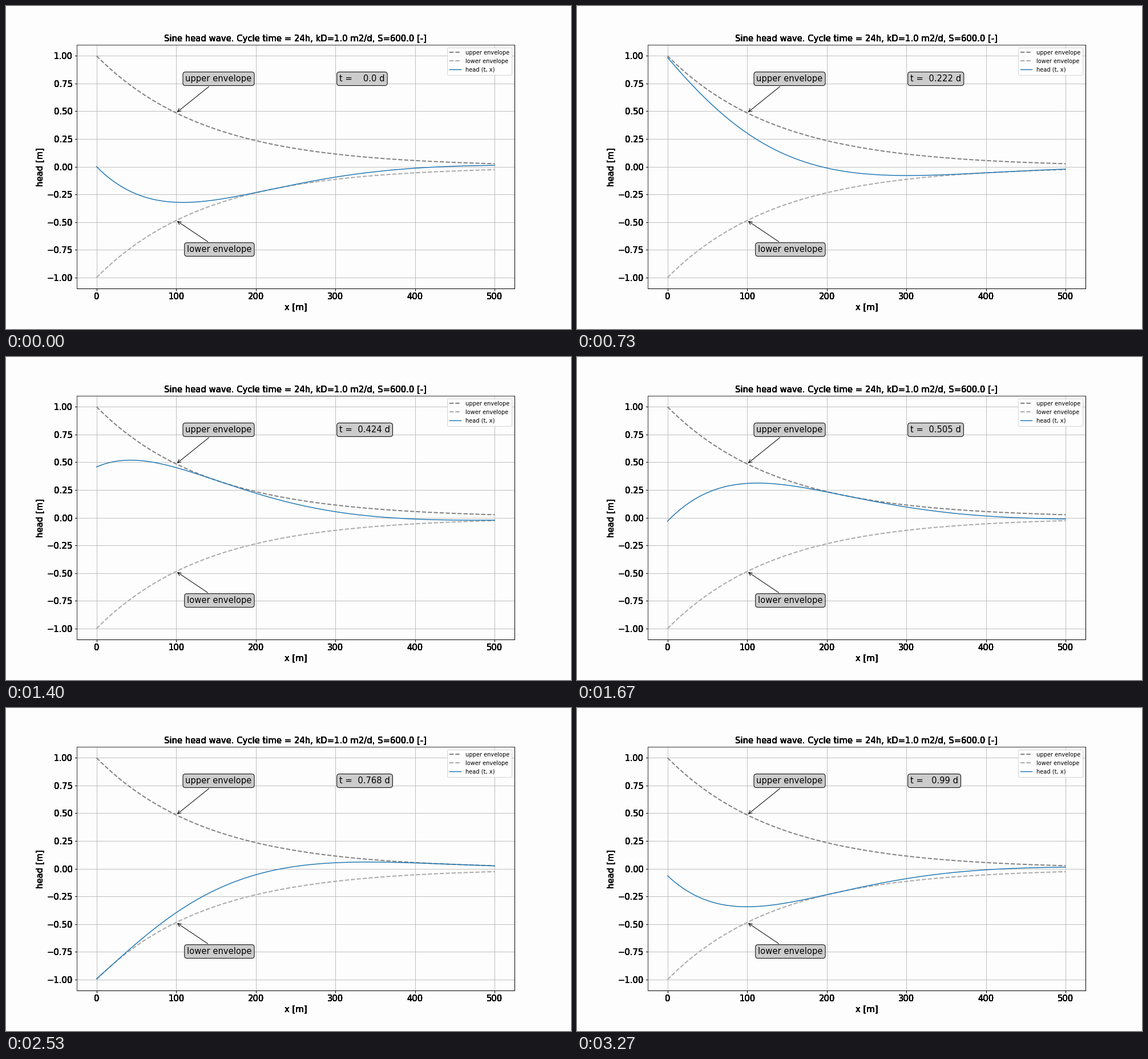
Write a matplotlib script that moves like this. It is 990x566 px and loops after 3310 ms.

```python
import numpy as np
import matplotlib.pyplot as plt
from matplotlib.animation import FuncAnimation

WIDTH, HEIGHT, DPI = 990, 566, 72
SCALE = WIDTH / 1008  # a 14 inch wide chart, shrunk to the stage
LOOP_MS, TICK_MS = 3310, 10
STEPS = 99
PAPER = "#fdfdfd"
RECT = [0.125, 0.125, 0.775, 0.755]
BOX = dict(boxstyle="round", fc="0.8", ec="black")
LABEL_LAYERS = 8  # stacked drawing darkens the outer text

FONT = 15 * SCALE
plt.rcParams.update({"font.family": "DejaVu Sans", "font.size": FONT,
                     "axes.titlesize": FONT, "axes.labelsize": FONT,
                     "xtick.labelsize": FONT, "ytick.labelsize": FONT,
                     "legend.fontsize": 10 * SCALE,
                     "lines.linewidth": 1.5 * SCALE})

# Sinusoidal head at x = 0, damped and delayed along the aquifer
omega = 2 * np.pi
damping = np.sqrt(omega * 0.01 / (2 * 600))
x = np.linspace(0, 500, 201)
envelope = np.exp(-damping * x)


def head(t):
    return envelope * np.sin(omega * t - damping * x)


def add_axes():
    ax = fig.add_axes(RECT, facecolor=PAPER)
    ax.set(xlim=(-25, 525), ylim=(-1.1, 1.1))
    return ax


def add_labelled_axes():
    ax = add_axes()
    ax.set(xlabel="x [m]", ylabel="head [m]",
           yticks=np.linspace(-1, 1, 9), xticks=range(0, 501, 100))
    ax.set_title("Sine head wave. Cycle time = 24h, "
                 "kD=1.0 m2/d, S=600.0 [-]")
    return ax


def add_envelope(ax, name, sign, color, text_y):
    ax.plot(x, sign * envelope, "--", color=color, lw=2 * SCALE, label=name)
    ax.annotate(name, xy=(100, sign * np.exp(-damping * 100)),
                xytext=(0.4, text_y), textcoords="axes fraction",
                ha="right", bbox=BOX, arrowprops=dict(arrowstyle="->"))


def draw_chart():
    for _ in range(LABEL_LAYERS):
        ax = add_labelled_axes()
    ax.grid(True)
    add_envelope(ax, "upper envelope", 1, "gray", 0.85)
    add_envelope(ax, "lower envelope", -1, "darkgray", 0.15)
    ax.plot([], [], color="tab:blue", label="head (t, x)")
    ax.legend(loc="upper right")


fig = plt.figure(figsize=(WIDTH / DPI, HEIGHT / DPI), dpi=DPI,
                 facecolor=PAPER)

# The chart never changes: render it once and keep it as the backdrop
draw_chart()
fig.canvas.draw()
backdrop = np.array(fig.canvas.buffer_rgba())
fig.clear()
fig.figimage(backdrop, origin="upper", zorder=-1)

stage = add_axes()
stage.set_axis_off()
curve, = stage.plot(x, head(0), color="tab:blue")
clock = stage.text(0.6, 0.85, "", transform=stage.transAxes, bbox=BOX)


def update(tick):
    step = min((3 * tick + 1) // 10, STEPS - 1)  # 30 steps per second
    t = step / STEPS
    curve.set_ydata(head(t))
    clock.set_text(f"t = {t:6.3} d")
    return curve, clock


anim = FuncAnimation(fig, update, frames=LOOP_MS // TICK_MS,
                     interval=TICK_MS, repeat=True, repeat_delay=0)
plt.show()
```
